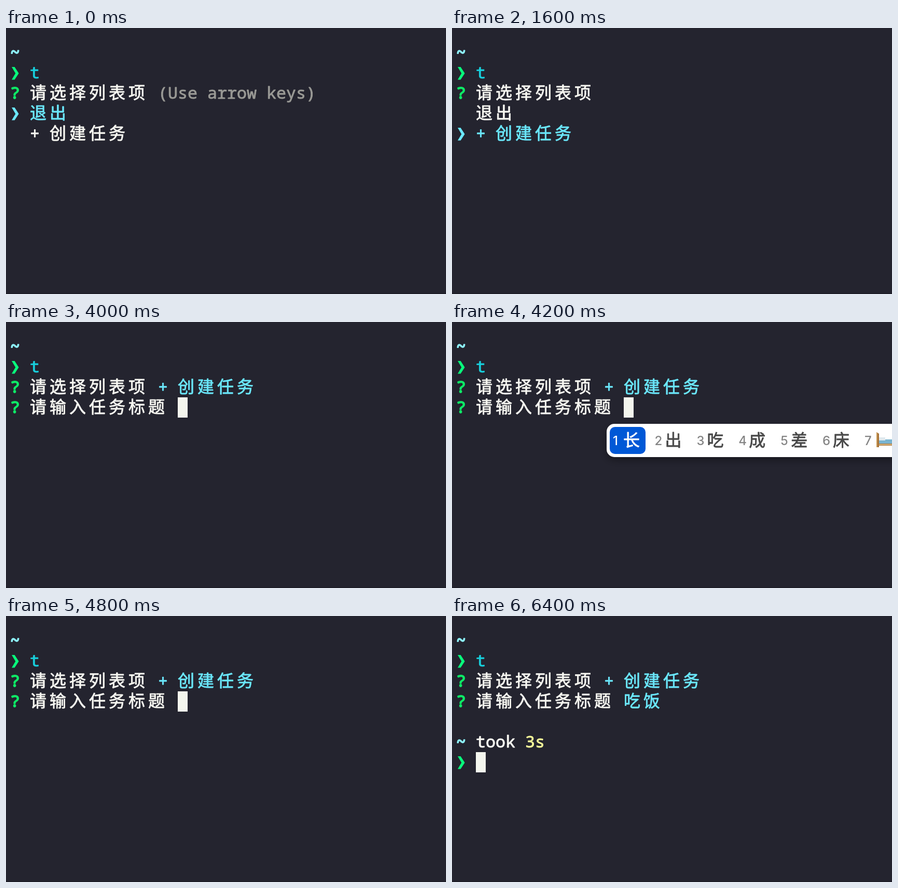
Animation, 848 px wide and 512 px high, one loop 8000 ms. Source, as an HTML page:

```html
<!DOCTYPE html>
<html lang="zh-CN">
<head>
<meta charset="utf-8">
<title>Terminal task list</title>
<style>
  html, body { margin: 0; width: 100%; height: 100%; overflow: hidden; background: #24242f; }
  svg { display: block; width: 848px; height: 512px; }
  text { white-space: pre; fill: currentColor; stroke: currentColor; stroke-width: 0; stroke-linejoin: round; }
  .mono { font: 500 31.67px "Noto Sans Mono", "DejaVu Sans Mono", monospace; stroke-width: .9px; }
  .heavy { stroke-width: 1.8px; }
  .han { font: 400 32px "Noto Sans CJK SC", "Noto Sans CJK", sans-serif; letter-spacing: 6px; stroke-width: .8px; }
  .num { font: 500 24px Inter, "Liberation Sans", sans-serif; }
</style>
</head>
<body>
<svg id="stage" viewBox="0 0 848 512">
  <defs>
    <filter id="shade" x="-10%" y="-50%" width="120%" height="220%">
      <feDropShadow dx="0" dy="6" stdDeviation="8" flood-color="#000" flood-opacity=".35"/>
    </filter>
  </defs>
  <rect width="848" height="512" fill="#24242f"/>
  <rect y="510" width="848" height="2" fill="#1e1e28"/>
</svg>
<script>
const stage = document.getElementById('stage');
const COL = 19, ROW = 39, LEFT = 8, TOP = 28, BASE = 30;
const C = {
  white: '#f8f8f2', sky: '#6be8fc', path: '#8ef4fb', teal: '#18cedb',
  green: '#08fb7c', ask: '#0eea66', gray: '#999995', yellow: '#f8fb9a', cursor: '#f4f6ee'
};

function add(parent, tag, attrs, content) {
  const el = document.createElementNS('http://www.w3.org/2000/svg', tag);
  for (const key in attrs) el.setAttribute(key, attrs[key]);
  if (content) el.textContent = content;
  parent.appendChild(el);
  return el;
}

const group = () => add(stage, 'g', { visibility: 'hidden' });
const colX = col => LEFT + col * COL;
const rowY = row => TOP + row * ROW;

function put(g, row, col, str, color, cls = 'mono') {
  add(g, 'text', { x: colX(col), y: rowY(row) + BASE, color, class: cls }, str);
}
const han = (g, row, col, str, color) => put(g, row, col, str, color, 'han');
const tilde = (g, row) => put(g, row, 0, '~', C.path, 'mono heavy');
const ask = (g, row) => put(g, row, 0, '?', C.ask, 'mono heavy');

function chevron(g, row, fill) {
  add(g, 'path', {
    d: 'M0 0h5.6l8 12.3-8 12.3h-5.6l7.3-12.3z', fill,
    transform: `translate(11 ${rowY(row) + 8})`
  });
}

function cursor(g, row, col) {
  add(g, 'rect', { x: colX(col), y: rowY(row), width: COL, height: ROW, fill: C.cursor });
}

function header(g) {
  tilde(g, 0);
  chevron(g, 1, C.green);
  put(g, 1, 2, 't', C.teal);
  ask(g, 2);
  han(g, 2, 2, '请选择列表项', C.white);
}

function menu(selected) {
  const g = group();
  const tint = i => i === selected ? C.sky : C.white;
  header(g);
  if (selected === 0) put(g, 2, 15, '(Use arrow keys)', C.gray);
  chevron(g, 3 + selected, C.sky);
  han(g, 3, 2, '退出', tint(0));
  put(g, 4, 2, '+', tint(1));
  han(g, 4, 4, '创建任务', tint(1));
  return g;
}

function form(answer, done) {
  const g = group();
  header(g);
  put(g, 2, 15, '+', C.sky);
  han(g, 2, 17, '创建任务', C.sky);
  ask(g, 3);
  han(g, 3, 2, '请输入任务标题', C.white);
  if (answer) han(g, 3, 17, answer, done ? C.sky : C.white);
  if (!done) {
    cursor(g, 3, 17 + answer.length * 2);
    return g;
  }
  tilde(g, 5);
  put(g, 5, 2, 'took', C.white);
  put(g, 5, 7, '3s', C.yellow);
  chevron(g, 6, C.green);
  cursor(g, 6, 2);
  return g;
}

function bed(g) {
  const part = (x, y, width, height, fill) => add(g, 'rect', { x, y, width, height, fill });
  part(822, 232, 40, 6, '#a9793f');
  part(823, 226, 40, 8, '#79b4d0');
  part(823, 222, 12, 6, '#dfe9ee');
  part(823, 235, 40, 2, '#d7b27a');
  add(g, 'path', { d: 'M818 212l5 3v26h-5z', fill: '#a8743a' });
  part(818, 213, 2, 28, '#c99a57');
}

function candidates() {
  const g = group();
  add(g, 'rect', { x: 298, y: 196, width: 620, height: 64, rx: 15, fill: '#fff', filter: 'url(#shade)' });
  add(g, 'rect', { x: 304, y: 202, width: 69, height: 52, rx: 10, fill: '#0058d6' });
  [...'长出吃成差床'].forEach((ch, i) => {
    const x = i ? 410.5 + 80.9 * (i - 1) : 330;
    add(g, 'text', { x: x - 20, y: 237, class: 'num', color: i ? '#858585' : '#fff' }, String(i + 1));
    add(g, 'text', { x, y: 239, class: 'han', color: i ? '#484848' : '#fff' }, ch);
  });
  add(g, 'text', { x: 795, y: 237, class: 'num', color: '#858585' }, '7');
  bed(g);
  return g;
}

// Each part with the time span, in ms, in which it is on screen
const LOOP = 8000;
const parts = [
  [menu(0), 0, 800],
  [menu(1), 800, 1800],
  [form('', false), 1800, 5000],
  [candidates(), 4200, 4800],
  [form('吃饭', false), 5000, 5600],
  [form('吃饭', true), 5600, LOOP]
];

function draw() {
  const t = performance.now() % LOOP;
  for (const [g, from, to] of parts) {
    g.setAttribute('visibility', t >= from && t < to ? 'visible' : 'hidden');
  }
  requestAnimationFrame(draw);
}
draw();
</script>
</body>
</html>
```
